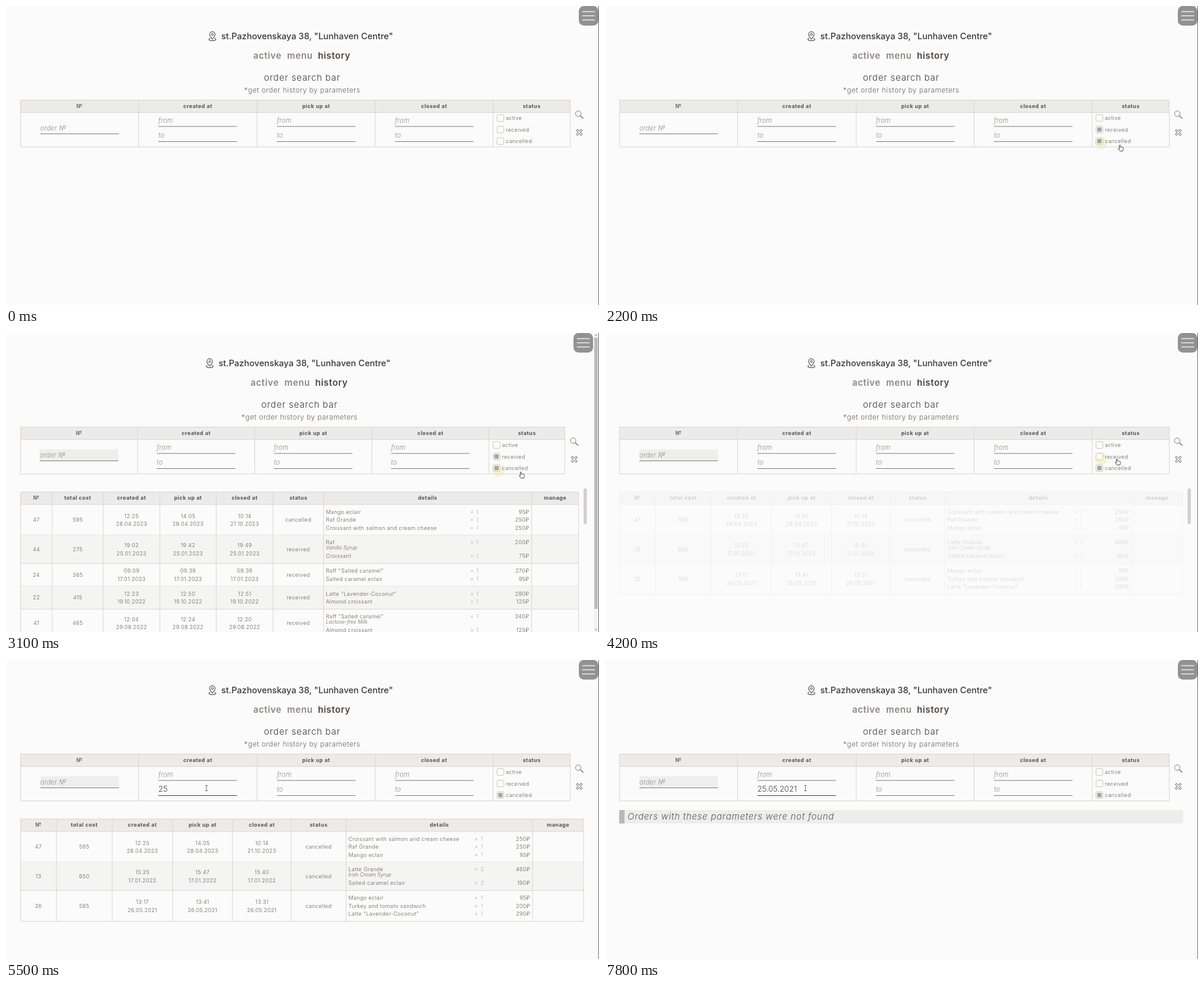
These frames come from a looping animation (1000x504 px, 8 s). An HTML page:

```html
<!DOCTYPE html>
<html lang="en">
<head>
<meta charset="utf-8">
<title>Order history</title>
<style>
  html, body { margin: 0; width: 100%; height: 100%; overflow: hidden; background: #fafbfa; }
  svg { display: block; width: 100vw; height: 100vh; font-family: Inter, "Open Sans", sans-serif; }
  text { white-space: pre; }
  .addr { font-size: 14.6px; font-weight: 500; fill: #3b3938; }
  .tab { font-size: 15px; font-weight: 600; letter-spacing: .042em; fill: #8b8785; }
  .on { fill: #4a4543; }
  .cap { font-size: 15px; font-weight: 300; letter-spacing: .055em; fill: #3f3d3c; }
  .note { font-size: 12px; font-weight: 300; letter-spacing: .037em; fill: #6a6766; }
  .head { font-size: 9px; font-weight: 700; letter-spacing: .05em; fill: #575351; }
  .cell { font-size: 9px; font-weight: 350; letter-spacing: .044em; fill: #64605e; }
  .dim { fill: #aeabaa; }
  .sub { font-size: 8.6px; font-weight: 300; font-style: italic; fill: #6d6967; }
  .hint { font-size: 11px; font-weight: 300; font-style: italic; letter-spacing: .02em; fill: #8f8c8b; }
  .val { font-size: 13px; font-weight: 300; fill: #454241; }
  .msg { font-size: 15px; font-weight: 300; font-style: italic; letter-spacing: .05em; fill: #5a5654; }
</style>
</head>
<body>
<svg id="stage" viewBox="0 0 1000 504" preserveAspectRatio="none"></svg>
<script>
const LOOP = 8000, STEP = 100;
const LINE = '#d9d6d4', HEAD = '#ecebe9';
const stage = document.getElementById('stage');

const clamp = v => Math.max(0, Math.min(1, v));
const ramp = (t, from, to) => clamp((t - from) / (to - from));
const text = (x, y, s, cls, anchor = 'start') =>
  `<text x="${x}" y="${y}" class="${cls}" text-anchor="${anchor}">${s}</text>`;
const mid = (x, y, s, cls) => text(x, y, s, cls, 'middle');
const rect = (x, y, w, h, fill, more = '') =>
  `<rect x="${x}" y="${y}" width="${w}" height="${h}" fill="${fill}" ${more}/>`;
const path = (d, stroke, w = 1, more = '') =>
  `<path d="${d}" fill="none" stroke="${stroke}" stroke-width="${w}" ${more}/>`;
const group = (s, opacity) => opacity > 0 ? `<g opacity="${opacity}">${s}</g>` : '';

// Layout without and with the page scrollbar
const WIDE = { shift: 0, menu: 966, icons: 0, pad: 33.5, box: 6,
  search: [24.5, 223.5, 423.5, 622.5, 821.5, 951.5],
  orders: [24.5, 85, 179, 281, 382, 481, 573.5, 888, 974], qty: 793.5, thumb: 982.5 };
const NARROW = { shift: -4.5, menu: 957, icons: -8.5, pad: 32.3, box: 6.5,
  search: [24.5, 222, 419.5, 617, 814.5, 942.5],
  orders: [24.5, 78, 164, 259.5, 354.5, 450.5, 535.5, 886.5, 965.5], qty: 786, thumb: 974 };

// Order: number, cost, created, picked up, closed, status, row height, items
// Item: name, quantity, price, optional extra
const ALL = [
  [47, 595, '12:25 28.04.2023', '14:05 28.04.2023', '10:14 21.10.2023', 'cancelled', 52,
    [['Mango eclair', 1, 95], ['Raf Grande', 1, 250], ['Croissant with salmon and cream cheese', 1, 250]]],
  [44, 275, '19:02 25.01.2023', '19:42 25.01.2023', '19:49 25.01.2023', 'received', 47.5,
    [['Raf', 1, 200, 'Vanilla Syrup'], ['Croissant', 1, 75]]],
  [24, 365, '09:09 17.01.2023', '09:39 17.01.2023', '09:39 17.01.2023', 'received', 38.5,
    [['Raff "Salted caramel"', 1, 270], ['Salted caramel eclair', 1, 95]]],
  [22, 415, '12:23 19.10.2022', '12:50 19.10.2022', '12:51 19.10.2022', 'received', 38.5,
    [['Latte "Lavender-Coconut"', 1, 290], ['Almond croissant', 1, 125]]],
  [41, 465, '12:04 29.08.2022', '12:24 29.08.2022', '12:20 29.08.2022', 'received', 47.5,
    [['Raff "Salted caramel"', 1, 340, 'Lactose-free Milk'], ['Almond croissant', 1, 125]]]
];
const CANCELLED = [
  [...ALL[0].slice(0, 7), [...ALL[0][7]].reverse()],
  [13, 650, '15:25 17.01.2022', '15:47 17.01.2022', '15:40 17.01.2022', 'cancelled', 47.5,
    [['Latte Grande', 2, 460, 'Irish Cream Syrup'], ['Salted caramel eclair', 2, 190]]],
  [26, 585, '13:17 26.05.2021', '13:41 26.05.2021', '13:31 26.05.2021', 'cancelled', 52,
    [['Mango eclair', 1, 95], ['Turkey and tomato sandwich', 1, 200], ['Latte "Lavender-Coconut"', 1, 290]]]
];

function grid(cols, top, bottom) {
  const l = cols[0], r = cols[cols.length - 1];
  return path(`M${l} ${top}H${r}M${l} ${bottom}H${r}` +
    cols.map(x => `M${x} ${top}V${bottom}`).join(''), LINE);
}

function headRow(cols, top, names) {
  const l = cols[0], r = cols[cols.length - 1];
  return rect(l, top, r - l, 21, HEAD) +
    names.map((n, i) => mid((cols[i] + cols[i + 1]) / 2, top + 13.3, n, 'head')).join('') +
    path(`M${l} ${top + 21}H${r}`, LINE);
}

function orderTable(lay, rows) {
  const c = lay.orders, centre = i => (c[i] + c[i + 1]) / 2;
  let s = headRow(c, 268, ['№', 'total cost', 'created at', 'pick up at', 'closed at', 'status', 'details', 'manage']);
  let y = 289;
  rows.forEach((row, n) => {
    const h = row[6], my = y + h / 2 + 3;
    if (n % 2) s += rect(c[0], y, c[8] - c[0], h, '#f4f4f3');
    [0, 1, 5].forEach(i => s += mid(centre(i), my, row[i], 'cell'));
    [2, 3, 4].forEach(i => row[i].split(' ').forEach((part, k) =>
      s += mid(centre(i), my - 6.5 + k * 13.5, part, 'cell')));
    const items = row[7];
    const span = items.slice(0, -1).reduce((a, it) => a + (it[3] ? 23 : 13.5), 0);
    let iy = my - span / 2;
    items.forEach(([name, qty, price, extra]) => {
      s += text(c[6] + 4, iy, name, 'cell') + mid(lay.qty, iy, '×', 'cell dim') +
        text(lay.qty + 7, iy, qty, 'cell dim') + text(c[7] - 4, iy, price + '₽', 'cell', 'end');
      if (extra) s += text(c[6] + 4, iy + 8.8, extra, 'sub');
      iy += extra ? 23 : 13.5;
    });
    y += h;
    s += path(`M${c[0]} ${y}H${c[8]}`, LINE);
  });
  return s + grid(c, 268, y);
}

function header(lay) {
  const pin = path('M348 56C344.3 51.6 343.4 50 343.4 48a4.6 4.6 0 0 1 9.2 0C352.6 50 351.7 51.6 348 56Z' +
    'M344.3 54.3c-4 1.4-2.4 4.2 3.7 4.2s7.7-2.8 3.7-4.2', '#4a4746', 1.1) +
    '<circle cx="348" cy="48" r="1.6" fill="none" stroke="#4a4746"/>';
  return `<g transform="translate(${lay.shift} 0)">` + pin +
    text(363, 56, 'st.Pazhovenskaya 38, "Lunhaven Centre"', 'addr') +
    text(417, 89, 'active', 'tab') + text(474, 89, 'menu', 'tab') + text(526, 89, 'history', 'tab on') +
    mid(499.5, 126, 'order search bar', 'cap') +
    mid(499.5, 145.5, '*get order history by parameters', 'note') + '</g>' +
    rect(lay.menu, 0, 33, 33, '#929292', 'rx="8.5"') +
    path([9.5, 16.5, 23.5].map(y => `M${lay.menu + 6.5} ${y}h20`).join(''), '#efefef', 1.7, 'stroke-linecap="round"');
}

function searchBar(lay, st) {
  const c = lay.search;
  let s = headRow(c, 158.5, ['№', 'created at', 'pick up at', 'closed at', 'status']) + grid(c, 158.5, 237.5);
  const line = (x, y, color = '#7d7a79') => path(`M${x} ${y}h132.5`, color);

  const ox = c[0] + lay.pad;
  if (st.filled) s += rect(ox, 196, 132.5, 19, '#eeeeed');
  s += text(ox, 209.6, 'order №', 'hint') + line(ox, 215.5);
  for (let i = 1; i < 4; i++) {
    const x = c[i] + lay.pad, typed = i === 1 && st.typed;
    s += text(x, 197.3, 'from', 'hint') + line(x, 203);
    s += typed ? text(x, 222, typed, 'val') : text(x, 222.3, 'to', 'hint');
    s += line(x, 228.5, i === 1 && st.focus ? '#3f3c3b' : undefined);
  }

  const bx = c[4] + lay.box;
  ['active', 'received', 'cancelled'].forEach((name, i) => {
    const y = 183 + i * 19.5, spread = st.spread[i], off = 6 + 3 * spread;
    s += group(`<circle cx="${bx + off}" cy="${y + off}" r="${8.5 + 2 * spread}" fill="#f7e58c"/>`, st.halo[i]);
    s += rect(bx + .5, y, 11.5, 11.5, '#fbfbfa', 'rx="2.5" stroke="#c8c4c2"');
    s += group(rect(bx + 2.5, y + 2, 7.5, 7.5, '#a8a5a4', 'rx="1"'), st.check[i]);
    s += text(bx + 15.5, y + 9, name, 'cell');
  });

  const cross = 'M961.8 209.6l1.8-1.8 3.2 3.2 3.2-3.2 1.8 1.8-3.2 3.4 3.2 3.4-1.8 1.8-3.2-3.2-3.2 3.2-1.8-1.8 3.2-3.4Z';
  return s + `<g transform="translate(${lay.icons} 0)">` +
    '<circle cx="965" cy="181.5" r="4.6" fill="none" stroke="#7d7a79"/>' +
    path('M968.5 185l4.6 4.2', '#7d7a79', 1.6, 'stroke-linecap="round"') +
    path(cross, '#4a4746', 1, 'stroke-linejoin="round"') + '</g>';
}

function pageScroll() {
  return rect(991, 0, 9, 504, '#f3f3f3') + rect(992, 8, 6, 457, '#bcbcbc') +
    '<path d="M993 5l2-3 2 3ZM993 499l2 3 2-3Z" fill="#aaa"/>';
}

const notFound = rect(24, 253, 951, 22.5, '#efedec') + rect(24, 253, 9, 22.5, '#beb6b3') +
  text(38, 269, 'Orders with these parameters were not found', 'msg');

function hand(x, y) {
  return `<path transform="translate(${x} ${y})" fill="#fff" stroke="#333" stroke-width=".9" stroke-linejoin="round"
    d="M-2.6 1.5V-4.2q.9-1.3 1.8 0V-1q.9-.8 1.7.2.9-.6 1.6.3 1-.4 1.6.6V2.6L3.2 5.5H-1.6L-4.6 1.3q.5-1.2 2 .2Z"/>`;
}
const beam = (x, y) => path(`M${x - 2} ${y - 4.5}h4M${x} ${y - 4.5}v9M${x - 2} ${y + 4.5}h4`, '#555', .9);

function cursor(t) {
  if (t < 400) return '';
  if (t < 2100) return hand(872, 217);
  if (t < 2200) return hand(871, 231);
  if (t < 3400) return hand(870, 239);
  if (t < 3500) return hand(867, 226);
  if (t < 5200) return hand(865, 217);
  return beam(338, 216);
}

const KEYS = [5400, 5500, 5600, 5900, 6200, 6300, 6400, 6700];
function typed(t) {
  const d = '25052021'.slice(0, KEYS.filter(k => t >= k).length);
  return [d.slice(0, 2), d.slice(2, 4), d.slice(4)].filter(Boolean).join('.');
}

function draw(t) {
  const lay = t >= 2500 && t < 4200 ? NARROW : WIDE;
  const state = {
    filled: t >= 2500,
    focus: t >= 5200,
    typed: typed(t),
    check: [0, ramp(t, 1200, 1500) * (1 - ramp(t, 3400, 3700)), ramp(t, 2000, 2200)],
    spread: [0, ramp(t, 1300, 1500), ramp(t, 2000, 2200)],
    halo: [0,
      t < 1300 ? .4 * ramp(t, 300, 600)
        : t < 3400 ? (.9 - .5 * ramp(t, 1300, 1500)) * (1 - ramp(t, 2000, 2200))
        : .4 * ramp(t, 3300, 3600) * (1 - ramp(t, 5000, 5300)),
      .4 * ramp(t, 2000, 2200) * (1 - ramp(t, 3300, 3600))]
  };
  let s = rect(0, 0, 1000, 504, '#fafbfa');
  if (lay === NARROW) {
    s += group(orderTable(lay, ALL), Math.pow(ramp(t, 2400, 3100), 1.4));
  } else if (t >= 4200) {
    s += group(orderTable(lay, CANCELLED), ramp(t, 4100, 4500) * (1 - ramp(t, 6800, 7100)));
  }
  const thumb = ramp(t, 2700, 3100) * (1 - ramp(t, 4500, 4800));
  s += group(rect(lay.thumb, 262, 5.5, 60, '#d2d0cf', 'rx="2.5"'), thumb);
  s += group(notFound, ramp(t, 6900, 7400));
  s += searchBar(lay, state) + header(lay);
  if (lay === NARROW) s += pageScroll();
  s += rect(999, 0, 1, 504, '#6b6b6b') + cursor(t);
  stage.innerHTML = s;
}

let last = -1;
function tick(now) {
  const t = Math.floor(now % LOOP / STEP) * STEP;
  if (t !== last) draw(last = t);
  requestAnimationFrame(tick);
}
draw(0);
requestAnimationFrame(tick);
</script>
</body>
</html>
```
